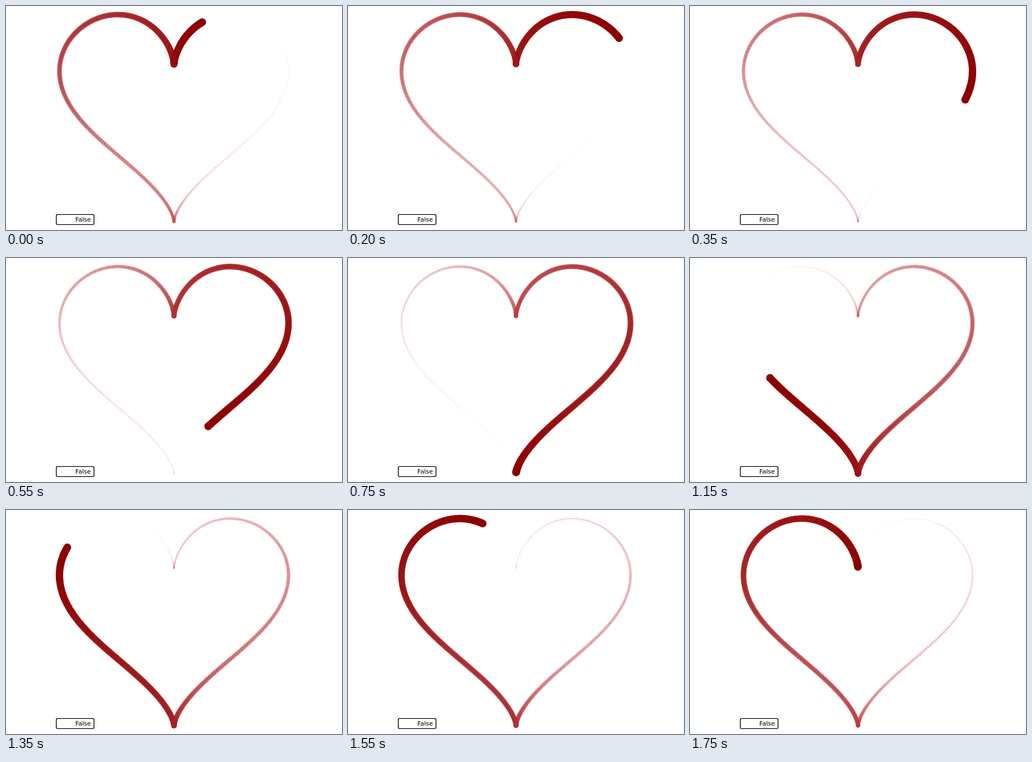
Animation of 600 by 400 pixels, one loop 1800 ms. Source, as an HTML page with a canvas:

```html
<!DOCTYPE html>
<html lang="en">
<head>
<meta charset="utf-8">
<title>Heart trail</title>
<style>
html, body { margin: 0; width: 100%; height: 100%; overflow: hidden; background: #fff; }
canvas { display: block; }
</style>
</head>
<body>
<canvas id="stage" width="600" height="400"></canvas>
<script>
const ctx = document.getElementById("stage").getContext("2d");
const COUNT = 400, STEP = 50, FRAMES = 36;
const FIRST = 43, ADVANCE = 10;
const SCALE = 12.78, CX = 300, CY = 167.7, MAX_R = 6.95;
const HEAD = [139, 0, 0], TAIL = [240, 140, 150];

const points = Array.from({ length: COUNT }, (_, i) => {
  const t = 2 * Math.PI * i / (COUNT - 1);
  const x = 16 * Math.sin(t) ** 3;
  const y = 13 * Math.cos(t) - 5 * Math.cos(2 * t) - 2 * Math.cos(3 * t) - Math.cos(4 * t);
  return [CX + SCALE * x, CY - SCALE * y];
});

function dot([x, y], k) {
  const rgb = HEAD.map((c, i) => Math.round(TAIL[i] + (c - TAIL[i]) * k));
  ctx.fillStyle = `rgba(${rgb}, ${k})`;
  ctx.beginPath();
  ctx.arc(x, y, MAX_R * k, 0, 2 * Math.PI);
  ctx.fill();
}

function legend() {
  ctx.strokeStyle = "#000";
  ctx.lineWidth = 1.39;
  ctx.fillStyle = "#fff";
  ctx.beginPath();
  ctx.roundRect(89.8, 372.4, 67.4, 18, 2.6);
  ctx.fill();
  ctx.stroke();
  ctx.fillStyle = "#000";
  ctx.font = '11.11px "DejaVu Sans", sans-serif';
  ctx.fillText("False", 123.8, 384.5);
}

function draw(ms) {
  const frame = Math.floor(ms / STEP) % FRAMES;
  const head = FIRST + ADVANCE * frame;
  ctx.fillStyle = "#fff";
  ctx.fillRect(0, 0, 600, 400);
  // oldest dots first, so the head lies on top
  for (let age = COUNT - 1; age >= 0; age--) {
    dot(points[(head - age + COUNT) % COUNT], 1 - age / COUNT);
  }
  legend();
}

const start = performance.now();
function tick() {
  draw(performance.now() - start);
  requestAnimationFrame(tick);
}
tick();
</script>
</body>
</html>
```
